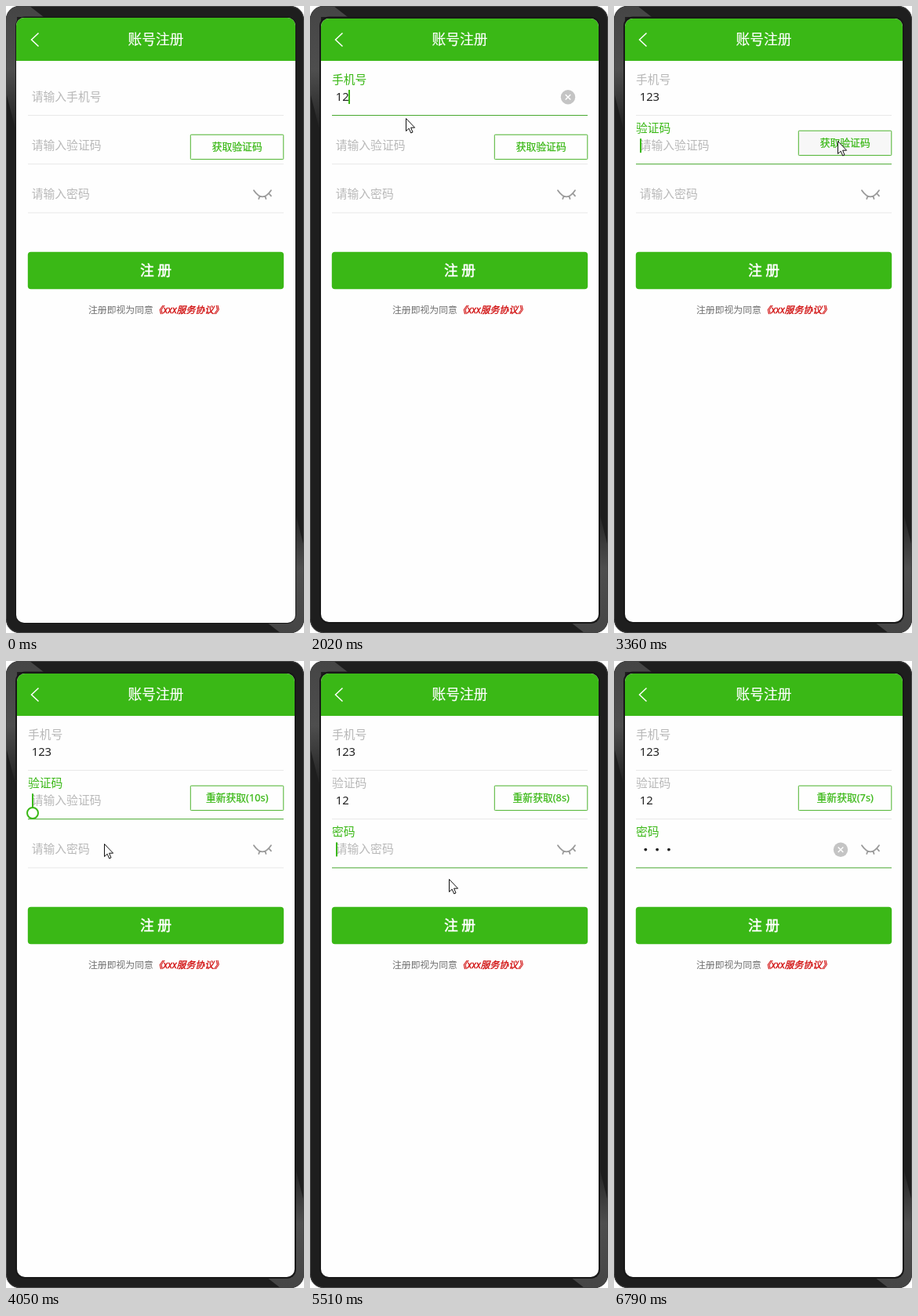
Animation of 380 by 800 pixels, one loop 6910 ms. Source, as an HTML page:

```html
<!DOCTYPE html>
<html lang="zh-CN">
<head>
<meta charset="utf-8">
<style>
  html, body { margin: 0; width: 100%; height: 100%; overflow: hidden; background: #fff; }
  svg { display: block; width: 380px; height: 800px; }
  text { font: 14.8px "Noto Sans", "Noto Sans CJK SC", "Noto Sans CJK", sans-serif; fill: #b8b8b8; }
  .white { font-size: 17.8px; fill: #fff; stroke: #fff; stroke-width: .2; }
  .value { fill: #222; }
  .small { font-size: 12.8px; fill: #3ab816; stroke: #3ab816; stroke-width: .25; }
  .note { font-size: 11.85px; fill: #707070; }
  .link { fill: #d00b0b; stroke: #d00b0b; stroke-width: .35; font-style: italic; }
  .strong { stroke-width: .5; }
  .mid { text-anchor: middle; }
</style>
</head>
<body>
<svg id="stage" viewBox="0 0 380 800">
  <defs>
    <linearGradient id="shineFill" x2="0" y2="1">
      <stop offset="0" stop-color="#454545"/><stop offset=".5" stop-color="#4e4e4e"/><stop offset="1" stop-color="#1c1c1c"/>
    </linearGradient>
    <clipPath id="screenClip"><rect id="screenBox" rx="10"/></clipPath>
    <clipPath id="body"><rect width="380" height="800" rx="17"/></clipPath>
  </defs>
  <g clip-path="url(#body)">
    <rect width="380" height="800" fill="#1e1e1e"/>
    <path id="shine" d="M0 0H30L48 14H14V165L0 110Z" fill="url(#shineFill)"/>
    <use href="#shine" transform="rotate(180 190 400)"/>
    <rect x=".5" y=".5" width="379" height="799" rx="17" fill="none" stroke="#454545"/>
    <rect x="12" y="13.5" width="358" height="774.5" rx="12" fill="#181818"/>
  </g>
  <g clip-path="url(#screenClip)">
    <rect y="10" width="380" height="780" fill="#fefefe"/>
    <rect y="10" width="380" height="60" fill="#3ab816"/>
  </g>
  <path d="M41.5 34.5L32.5 43L41.5 51.5" fill="none" stroke="#fff" stroke-width="1.5"/>
  <text class="white mid" x="191" y="48.7">账号注册</text>
  <g id="fields"></g>
  <g id="codeButton">
    <rect id="codeFill" x="235.3" y="164.2" width="118.5" height="31.4" rx="1" stroke="#4bb22c"/>
    <text id="codeText" class="small mid" x="294.7" y="184.2"></text>
  </g>
  <path d="M316 235.3Q327 251.5 338 235.3M336 240L338 242.3M323.5 242.8L322.3 246M330.5 242.8L331.5 246"
    fill="none" stroke="#999" stroke-width="1.8" stroke-linecap="round"/>
  <rect x="27.8" y="313.8" width="326.4" height="47.5" rx="4" fill="#3ab816"/>
  <text class="white strong mid" x="191" y="343.8">注 册</text>
  <text class="note" x="105" y="392">注册即视为同意</text>
  <text class="note link" x="188.6" y="392">《xxx服务协议》</text>
  <path id="pointer" d="M.5 .5V16.6L4.2 13.2L6.7 19L9 18L6.6 12.2H11.6Z" fill="#fff" stroke="#111" stroke-width="1"/>
</svg>
<script>
const LOOP = 6910, STEP = 40, GREEN = '#3ab816';
const $ = id => document.getElementById(id);
const set = (el, attrs) => { for (const k in attrs) el.setAttribute(k, attrs[k]); };
const show = (el, on) => set(el, { visibility: on ? 'visible' : 'hidden' });

function add(parent, tag, attrs, text = '') {
  const el = document.createElementNS('http://www.w3.org/2000/svg', tag);
  set(el, attrs);
  el.textContent = text;
  return parent.appendChild(el);
}

// y is the underline; keys are the times at which characters arrive
const fields = [
  { name: '手机号', y: 139, clearX: 329, focus: 1050, blur: 2760, keys: [1460, 1780, 2060] },
  { name: '验证码', y: 201.2, clearX: 210, focus: 2760, blur: 5150, keys: [4410, 4610] },
  { name: '密码', y: 263.4, clearX: 289, focus: 5150, blur: LOOP, keys: [5750, 5950, 6190], secret: true }
];

for (const f of fields) {
  const g = $('fields');
  f.line = add(g, 'rect', { x: 28, y: f.y, width: 326, height: 1 });
  f.label = add(g, 'text', { x: 28, y: f.y - 40 }, f.name);
  f.hint = add(g, 'text', { x: 32.7, y: f.y - 18 }, '请输入' + f.name);
  f.value = add(g, 'text', { x: 32.7, y: f.y - 18, class: 'value' });
  f.dots = f.keys.map((_, i) => add(g, 'circle', { cx: 40.3 + 14.8 * i, cy: f.y - 22.8, r: 1.9, fill: '#222' }));
  f.clear = add(g, 'g', { transform: `translate(${f.clearX} ${f.y - 22.7})` });
  add(f.clear, 'circle', { r: 9.2, fill: '#c4c4c4' });
  add(f.clear, 'path', { d: 'M-3.3-3.3L3.3 3.3M3.3-3.3L-3.3 3.3', stroke: '#fff', 'stroke-width': 1.4 });
  f.caret = add(g, 'rect', { y: f.y - 32, width: 2, height: 18, fill: GREEN });
}
const handle = add($('fields'), 'circle', { cx: 34, cy: 194, fill: '#fff', stroke: GREEN, 'stroke-width': 2 });

const pointerPath = [
  [160, 107, 259], [400, 127, 138], [560, 127, 138], [720, 123, 122], [1860, 123, 122],
  [2020, 122, 143], [2140, 113, 173], [2840, 113, 173], [3200, 285, 172], [3440, 285, 172],
  [3600, 283, 179], [3890, 283, 179], [4050, 125, 233], [4170, 124, 238], [5230, 124, 238],
  [5510, 177, 278], [5630, 177, 278], [5990, 115, 300], [6310, 95, 350], [6350, 95, 350], [6750, 110, 800]
];

function pointerAt(t) {
  const i = pointerPath.findLastIndex(p => p[0] <= t);
  if (i < 0 || i === pointerPath.length - 1) return null;
  const [t0, x0, y0] = pointerPath[i], [t1, x1, y1] = pointerPath[i + 1];
  const k = Math.floor((t - t0) / STEP) * STEP / (t1 - t0);
  return [Math.round(x0 + (x1 - x0) * k), Math.round(y0 + (y1 - y0) * k)];
}

function drawField(f, t) {
  const active = t >= f.focus && t < f.blur;
  const count = f.keys.filter(k => k <= t).length;
  const fade = Math.min(1, (Math.floor((t - f.focus) / STEP) + 1) / 4);
  set(f.line, { fill: active ? '#48a82f' : '#e8e8e8' });
  set(f.label, { opacity: Math.max(0, fade) });
  f.label.style.fill = active ? GREEN : '#b8b8b8';
  show(f.hint, !count);
  f.value.textContent = f.secret ? '' : '123'.slice(0, count);
  f.dots.forEach((d, i) => show(d, f.secret && i < count));
  show(f.clear, active && count);
  set(f.caret, { x: 33 + Math.round(count * (f.secret ? 14.7 : 8.2)) });
  show(f.caret, active && t < 6390);
}

function drawCodeButton(t) {
  const left = t < 3440 ? 0 : 10 - Math.floor((t - 3440) / 1000);
  $('codeText').textContent = left ? `重新获取(${left}s)` : '获取验证码';
  set($('codeFill'), { fill: t >= 3360 && t < 3520 ? '#f7f7f7' : '#fefefe' });
  set($('codeButton'), { transform: `translate(0 ${t < 2760 ? 0 : -5})` });
}

function draw(t) {
  const inset = t < 1460 ? 0 : 1;
  set($('screenBox'), { x: 13 + inset, y: 15 + inset, width: 356 - 2 * inset, height: 772 - 2 * inset });
  fields.forEach(f => drawField(f, t));
  drawCodeButton(t);
  show(handle, t >= 3600 && t < 4410);
  set(handle, { r: t < 3930 ? 3 : 7 });
  const at = pointerAt(t);
  show($('pointer'), at);
  if (at) set($('pointer'), { transform: `translate(${at})` });
}

function tick() {
  draw(performance.now() % LOOP);
  requestAnimationFrame(tick);
}
tick();
</script>
</body>
</html>
```
